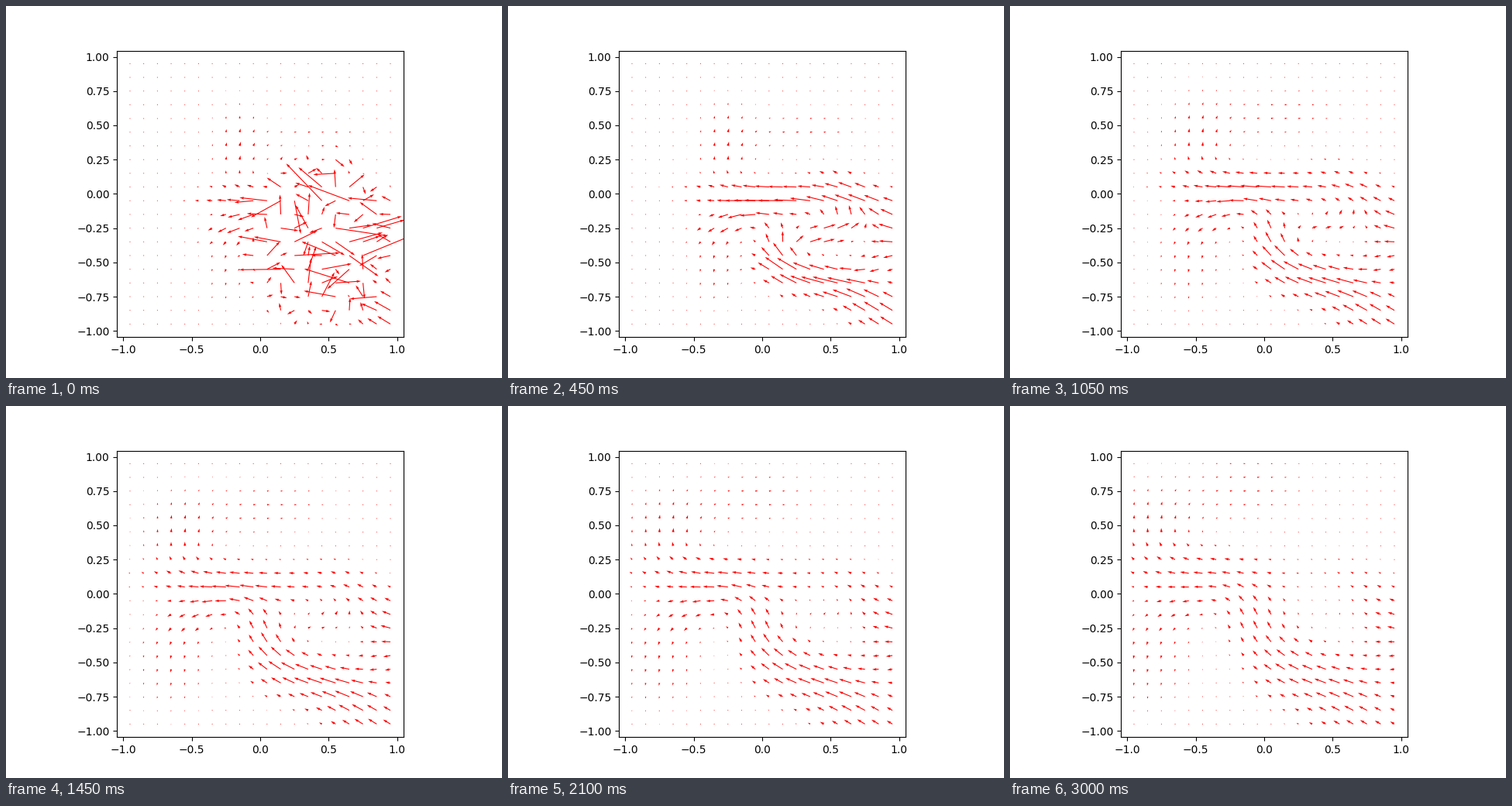
A matplotlib script for the animation above (3.05 s loop, 640 by 480 pixels).

```python
import numpy as np
import matplotlib.pyplot as plt
from matplotlib.animation import FuncAnimation

FRAMES, STEP = 61, 50
SETTLE = 0.25  # seconds until the opening turbulence has died out

axis = np.linspace(-0.95, 0.95, 20)
X, Y = np.meshgrid(axis, axis)

# Turbulence fills a soft-edged patch at the lower right.
rng = np.random.default_rng(11)
patch = np.exp(-(((X - 0.47) / 0.48) ** 2 + ((Y + 0.37) / 0.55) ** 2) ** 2)
noise = rng.normal(size=(2, 20, 20)) * np.array([30, 22])[:, None, None]


def flow(t):
    """Streams that drift, weaken and widen as the fluid settles."""
    age = (t + 0.4) / 1.05
    field = np.zeros((2, 20, 20))

    def stream(x, y, u, v, reach, width, drift=(0, 0), fade=0.7):
        dx = X - x - drift[0] * np.log(age)
        dy = Y - y - drift[1] * np.log(age)
        speed = np.hypot(u, v)
        along = (dx * u + dy * v) / speed / reach
        across = (dy * u - dx * v) / speed / (width * age**0.4)
        g = np.exp(-(along**2 + across**2) / 2) * age**-fade
        field[0] += u * g
        field[1] += v * g

    # jet to the left, its lower branch and its supply from the right
    stream(0.12, 0.00, -24, 1, 0.40, 0.085, (-0.46, 0.13))
    stream(-0.20, -0.15, -12, -4, 0.22, 0.08, (-0.35, 0.06))
    stream(0.80, -0.04, -10, 6, 0.30, 0.09, (0, 0.05))
    # clockwise swirl: bottom, lower left, left, top, right
    stream(0.45, -0.63, -20, 4, 0.26, 0.09)
    stream(0.15, -0.54, -8, 6, 0.16, 0.12, (0, 0.03), 0.15)
    stream(0.10, -0.36, -5, 11, 0.20, 0.10, (-0.15, 0.14), 0.1)
    stream(0.42, -0.28, 14, 3, 0.20, 0.07, (-0.05, 0.10), 1.8)
    stream(0.85, -0.52, -8, -4, 0.20, 0.09, (0.08, 0.03))
    stream(0.60, -0.15, 2, 8, 0.07, 0.18, (0, 0), 1.3)
    # inflow through the right side and the corner
    stream(1.00, -0.30, -15, 2, 0.15, 0.10, (-0.04, 0.04))
    stream(0.84, -0.86, -16, 10, 0.30, 0.13, (-0.15, 0), 0.5)
    # slow return flow around the jet: up, over the top, down
    stream(-0.35, 0.33, 0, 5.5, 0.28, 0.18, (-0.40, 0.09), 0)
    stream(0.20, 0.50, 3.5, 0.3, 0.40, 0.15, (-0.30, 0.22), 0)
    stream(-0.40, -0.45, -1, -4.5, 0.30, 0.18, (-0.40, 0), 0)
    return field


def field_at(t):
    calm = flow(max(t, SETTLE))
    rough = max(0, 1 - t / SETTLE) ** 2
    return calm + (noise - 0.6 * calm) * patch * rough


fig, ax = plt.subplots(figsize=(6.4, 4.8), dpi=100)
ax.set_aspect("equal")
ax.set_xlim(-1.045, 1.045)
ax.set_ylim(-1.045, 1.045)
ax.set_xticks(np.linspace(-1, 1, 5))
ax.set_yticks(np.linspace(-1, 1, 9))
arrows = ax.quiver(X, Y, *field_at(0), color="red", angles="uv",
                   scale_units="dots", scale=1, width=0.003)


def update(i):
    arrows.set_UVC(*field_at(i * STEP / 1000))
    return (arrows,)


anim = FuncAnimation(fig, update, frames=FRAMES, interval=STEP,
                     repeat=True, repeat_delay=0)
plt.show()
```
